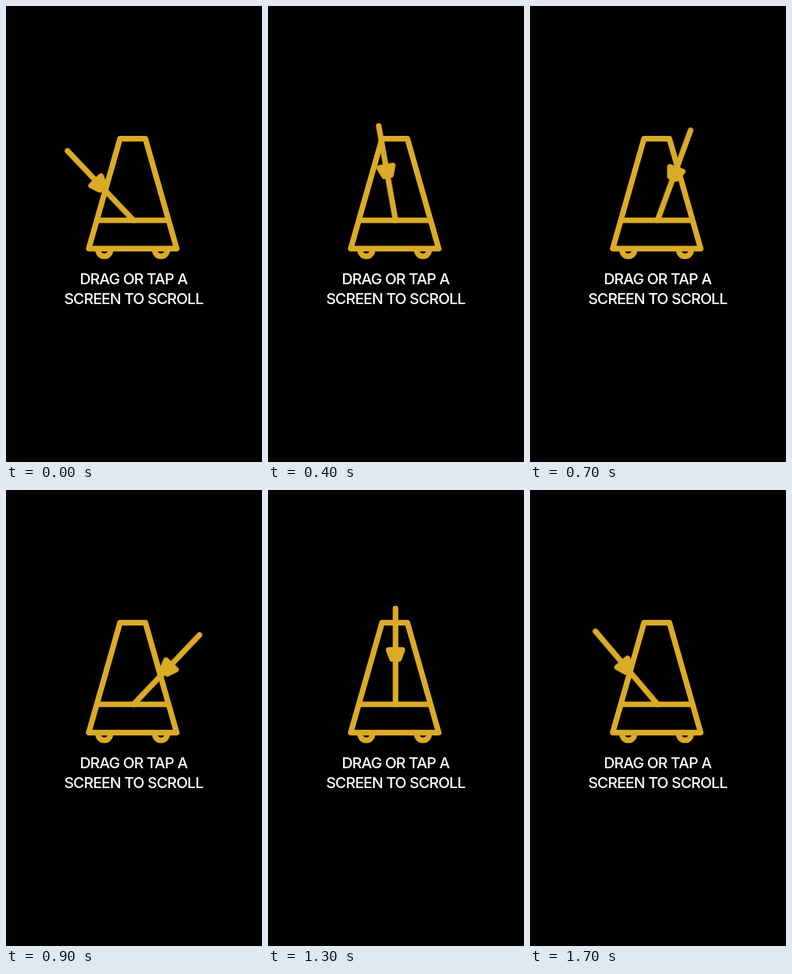
Animation, 375 px wide and 667 px high, one loop 1800 ms. Source, as an HTML page:

```html
<!DOCTYPE html>
<html lang="en">
<head>
<meta charset="utf-8">
<title>Metronome</title>
<style>
  html, body { margin: 0; width: 100%; height: 100%; overflow: hidden; background: #000; }
  svg { display: block; width: 375px; height: 667px; }
  .icon { fill: none; stroke: #dbab27; stroke-width: 8.2; stroke-linecap: round; stroke-linejoin: round; }
  .weight { fill: #dbab27; }
  .label {
    fill: #fff; text-anchor: middle;
    font: 500 22px Inter, Roboto, sans-serif;
    font-optical-sizing: none; letter-spacing: -.8px;
  }
  .arm { transform-origin: 186.8px 313.5px; animation: swing 1.8s infinite; }

  /* Even ticks across each sweep, with a wider pose held at both ends */
  @keyframes swing {
    0%     { transform: rotate(-43.6deg); animation-timing-function: step-end; }
    5.55%  { transform: rotate(-40.4deg); animation-timing-function: steps(8, end); }
    49.99% { transform: rotate(40.4deg); animation-timing-function: step-end; }
    50%    { transform: rotate(43.6deg); animation-timing-function: step-end; }
    55.55% { transform: rotate(30.3deg); animation-timing-function: steps(8, end); }
    99.99% { transform: rotate(-50.5deg); animation-timing-function: step-start; }
    100%   { transform: rotate(-43.6deg); }
  }
</style>
</head>
<body>
<svg viewBox="0 0 375 667">
  <g class="icon">
    <path d="M167 194.2H204.2L250 354.8H121.2Z"/>
    <path d="M134 313.5H237"/>
    <path d="M135 357.2a9 9 0 0 0 18 0M218 357.2a9 9 0 0 0 18 0"/>
    <g class="arm">
      <path d="M186.8 313.5V173.3"/>
      <path class="weight" d="M176.8 233.8H196.8L191.8 247.2H181.8Z"/>
    </g>
  </g>
  <g class="label">
    <text x="187" y="407">DRAG OR TAP A</text>
    <text x="187" y="436">SCREEN TO SCROLL</text>
  </g>
</svg>
</body>
</html>
```
